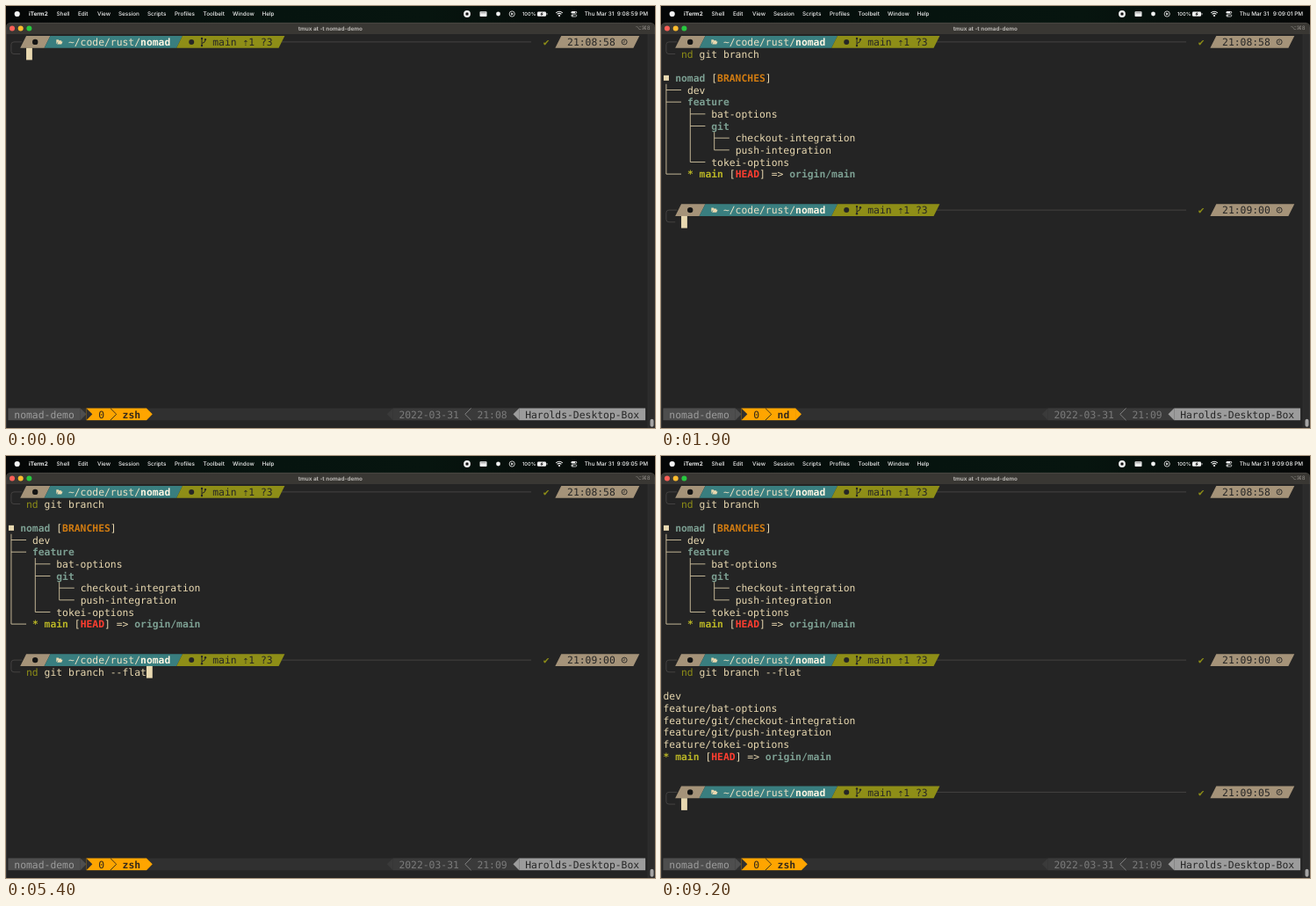
Recreate the animation shown at these times as an HTML page. Size 739 by 480 pixels, loop 9.3 s.

```html
<!DOCTYPE html>
<html lang="en">
<head>
<meta charset="utf-8">
<title>Terminal demo</title>
<style>
html, body { margin: 0; width: 100%; height: 100%; overflow: hidden; background: #000; }
svg { display: block; width: 739px; height: 480px; }
text { white-space: pre; text-rendering: geometricPrecision; font-kerning: none; }
.mono { font: 11.37px "DejaVu Sans Mono", monospace; font-variant-ligatures: none; }
.ui { font: 500 6.35px Inter, sans-serif; fill: #f2f2f2; }
.b { font-weight: 700; }
</style>
</head>
<body>
<svg id="stage" viewBox="0 0 739 480" xmlns="http://www.w3.org/2000/svg"></svg>
<script>
const LOOP = 9300, STEP = 100;
const CW = 6.845, RH = 13.66;
const X = c => 2.5 + c * CW;
const Y = r => 34.05 + r * RH;
const MID = r => Y(r) + RH / 2;

const CREAM = '#e8d8b0', TEAL = '#397e7f', TAN = '#a59379', OLIVE = '#8e8e17',
  DARK = '#262626', AQUA = '#7c9f92', ORANGE = '#d27c11', RED = '#ff3e30',
  LIME = '#b9b526', RULE = '#484644', AMBER = '#ffa500';

const mono = (c, r, s, fill = CREAM, bold = false) =>
  `<text class="mono${bold ? ' b' : ''}" x="${X(c)}" y="${Y(r) + 11}" fill="${fill}">${s.replace(/>/g, '&gt;')}</text>`;
const ui = (x, s, extra = '') => `<text class="ui" x="${x}" y="11.3" ${extra}>${s}</text>`;
const box = (x, y, w, h, fill, extra = '') =>
  `<rect x="${x}" y="${y}" width="${w}" height="${h}" fill="${fill}" ${extra}/>`;
const dot = (x, y, r, fill) => `<circle cx="${x}" cy="${y}" r="${r}" fill="${fill}"/>`;
const ring = (x, y, r, color, w = 0.8) =>
  `<circle cx="${x}" cy="${y}" r="${r}" fill="none" stroke="${color}" stroke-width="${w}"/>`;
const poly = (pts, fill) => `<polygon points="${pts}" fill="${fill}"/>`;
const line = (d, color, w = 0.9) =>
  `<path d="${d}" fill="none" stroke="${color}" stroke-width="${w}"/>`;
const group = (id, body) => `<g id="${id}">${body}</g>`;

// Segment with both ends cut like a slash
function slash(a, b, r, fill) {
  const t = Y(r), u = t + RH;
  return poly([X(a), u, X(a + 1), t, X(b + 1), t, X(b), u], fill);
}

// Filled powerline arrow, one cell wide; dir 1 points right, -1 left
function arrow(c, r, dir, fill) {
  const base = X(dir > 0 ? c : c + 1), tip = base + dir * CW;
  return poly([base, Y(r), tip, MID(r), base, Y(r) + RH], fill);
}

function prompt(r, clock) {
  const m = MID(r), cx = X(102.5);
  return line(`M${X(2.3)} ${m}H9Q5.9 ${m} 5.9 ${m + 3}V${m + RH - 3}Q5.9 ${m + RH} 9 ${m + RH}H${X(2)}`, RULE) +
    line(`M${X(45.5)} ${m}H${X(87)}`, RULE) +
    slash(2, 6, r, TAN) + slash(6, 28, r, TEAL) + slash(28, 45, r, OLIVE) + slash(91, 104, r, TAN) +
    dot(33.2, m, 3.2, '#141414') +
    `<path d="M57.3 ${m + 2.4}V${m - 2.6}h2.4l.8 .9h2.6v1.3h-3.8zM58.2 ${m + 2.6}l1.4-3h5l-1.4 3z" fill="${CREAM}"/>` +
    mono(10, r, '~/code/rust/', '#eadfc3') + mono(22, r, 'nomad', '#fbf5e2', true) +
    dot(211.2, m, 3, DARK) +
    line(`M223 ${m - 3.6}V${m + 4.4}M223 ${m + 1.6}Q227 ${m + 1} 227 ${m - 2.4}`, DARK, 1) +
    dot(223, m - 4, 1.2, DARK) + dot(223, m + 4.2, 1.2, DARK) + dot(227, m - 2.8, 1.2, DARK) +
    mono(34, r, 'main ⇡1 ?3', DARK) +
    mono(89, r, '✔', OLIVE) + mono(93, r, clock, DARK) +
    ring(cx, m, 3, DARK, 0.9) + line(`M${cx} ${m - 1.8}V${m + .4}H${cx - 1.5}`, DARK, 0.7);
}

const headLine = (c, r) =>
  mono(c, r, '*', LIME, true) + mono(c + 2, r, 'main', LIME, true) +
  mono(c + 7, r, '[') + mono(c + 8, r, 'HEAD', RED, true) + mono(c + 12, r, '] =>') +
  mono(c + 17, r, 'origin/main', AQUA, true);

// Tree stem in column c from row a to row z, with a branch at each listed row
function stem(c, a, z, rows) {
  const x = X(c + .5);
  return line(`M${x} ${Y(a)}V${MID(z)}` + rows.map(r => `M${x} ${MID(r)}H${X(c + 3)}`).join(''), '#d3c4a1', 0.9);
}

function tree() {
  return box(3, MID(3) - 3, 6, 6, CREAM) +
    mono(2, 3, 'nomad', AQUA, true) + mono(8, 3, '[') + mono(9, 3, 'BRANCHES', ORANGE, true) + mono(17, 3, ']') +
    mono(4, 4, 'dev') + mono(4, 5, 'feature', AQUA, true) + mono(8, 6, 'bat-options') +
    mono(8, 7, 'git', AQUA, true) + mono(12, 8, 'checkout-integration') +
    mono(12, 9, 'push-integration') + mono(8, 10, 'tokei-options') + headLine(4, 11) +
    stem(0, 4, 11, [4, 5, 11]) + stem(4, 6, 10, [6, 7, 10]) + stem(8, 8, 9, [8, 9]);
}

function flat() {
  return ['dev', 'feature/bat-options', 'feature/git/checkout-integration',
    'feature/git/push-integration', 'feature/tokei-options']
    .map((s, i) => mono(0, 17 + i, s)).join('') + headLine(0, 22);
}

const command = (id, r) =>
  `<text class="mono" x="${X(3)}" y="${Y(r) + 11}"><tspan id="${id}Cmd" fill="${OLIVE}"></tspan>` +
  `<tspan id="${id}Arg" fill="${CREAM}"></tspan></text>`;

function menuBar() {
  const items = [[57.5, 'Shell'], [82, 'Edit'], [104, 'View'], [128, 'Session'], [161, 'Scripts'],
    [192, 'Profiles'], [224.5, 'Toolbelt'], [258, 'Window'], [291.5, 'Help']];
  const w = '#f2f2f2';
  return box(0, 0, 739, 19, 'url(#sky)') + dot(12.7, 9, 3.1, w) +
    ui(26, 'iTerm2', 'font-weight="700" style="font-weight:700"') +
    items.map(([x, s]) => ui(x, s)).join('') +
    dot(525, 9, 3.9, w) + box(523.5, 7.5, 3, 3, '#111', 'rx=".5"') +
    box(539.5, 6.2, 8, 5.8, w, 'rx=".8"') + line('M540.5 7.8H546.5', '#555', 0.6) +
    dot(560.5, 9, 2.4, w) +
    ring(576.2, 9, 3.1, w) + poly([575.2, 7.4, 578, 9, 575.2, 10.6], w) +
    ui(588, '100%', 'style="font-size:5.7px"') +
    box(605, 6.5, 10, 5.2, w, 'rx="1.2"') + box(615.5, 8, 1, 2.2, '#aaa') +
    poly([610.8, 6.8, 608.2, 9.5, 609.8, 9.5, 609.2, 11.5, 612, 8.7, 610.3, 8.7], '#111') +
    line('M626.2 7.8Q630 4.6 633.8 7.8M627.6 9.4Q630 7.4 632.4 9.4', w, 1.1) + dot(630, 11, 1.1, w) +
    box(643.5, 6, 6.6, 2.6, w, 'rx="1.3"') + dot(648.7, 7.3, .8, '#111') +
    box(643.8, 9.8, 6, 2.2, 'none', `rx="1.1" stroke="${w}" stroke-width=".7"`) + dot(645, 10.9, .8, w) +
    ui(658.7, 'Thu Mar 31') + `<text class="ui" id="clock" x="731" y="11.3" text-anchor="end"></text>`;
}

function windowFrame() {
  return box(0, 19, 739, 470, '#242424', 'rx="5"') +
    `<path d="M0 32V24Q0 19 5 19H734Q739 19 739 24V32Z" fill="#393733"/>` +
    line('M4 19.3H735', '#55524d', 0.6) +
    line('M.4 24V480M738.6 24V480', '#484848', 0.6) +
    box(731, 32, 7.4, 448, '#2b2b2b') + line('M731 32V480', '#353535', 0.5) +
    box(733.5, 469.8, 4, 9, '#a5a5a5', 'rx="2"') +
    dot(7, 25.5, 3, '#ff5f57') + dot(16.7, 25.5, 3, '#febc2e') + dot(26.4, 25.5, 3, '#28c840') +
    `<text class="ui" x="369.3" y="27.6" text-anchor="middle" style="font-weight:700;fill:#b9b7b3">tmux at -t nomad-demo</text>` +
    `<text x="733.5" y="27.2" text-anchor="end" fill="#8d8a85" style="font:6px 'DejaVu Sans',sans-serif">⌥⌘8</text>`;
}

function statusBar() {
  const r = 31, y = Y(r), bar = '#303030', gray = '#4e4e4e', pale = '#9c9c9c', mid = '#3a3a3a';
  const span = (a, b, fill) => box(X(a), y, X(b) - X(a), RH, fill);
  return span(0, 106, bar) +
    span(0, 12, gray) + arrow(12, r, 1, gray) + mono(1, r, 'nomad-demo', pale) +
    `<rect id="tab" x="${X(13)}" y="${y}" height="${RH}" fill="${AMBER}"/>` +
    arrow(13, r, 1, bar) + mono(15, r, '0', '#33281a') +
    line(`M${X(17)} ${y}L${X(18)} ${MID(r)}L${X(17)} ${y + RH}`, '#33281a', 0.9) +
    `<text id="tabName" class="mono b" x="${X(19)}" y="${y + 11}" fill="#33281a"></text>` +
    `<g id="tabTip">${arrow(0, r, 1, AMBER)}</g>` +
    arrow(63, r, -1, mid) + span(64, 85, mid) + mono(65, r, '2022-03-31', '#7b7b7b') +
    line(`M${X(77)} ${y}L${X(76)} ${MID(r)}L${X(77)} ${y + RH}`, '#8a8a8a', 0.9) +
    `<text id="tmuxTime" class="mono" x="${X(78)}" y="${y + 11}" fill="#7b7b7b"></text>` +
    arrow(84, r, -1, pale) + span(85, 106, pale) + mono(86, r, 'Harolds-Desktop-Box', '#262626');
}

const $ = id => document.getElementById(id);
$('stage').innerHTML =
  `<defs><linearGradient id="sky"><stop offset="0" stop-color="#050606"/><stop offset=".42" stop-color="#06140f"/>` +
  `<stop offset=".65" stop-color="#07150f"/><stop offset="1" stop-color="#050606"/></linearGradient></defs>` +
  menuBar() + windowFrame() + statusBar() +
  prompt(0, '21:08:58') + command('first', 1) +
  group('treeOut', tree() + prompt(14, '21:09:00') + command('second', 15)) +
  group('flatOut', flat() + prompt(25, '21:09:05')) +
  `<rect id="cursor" width="${CW}" height="${RH}" fill="${CREAM}"/>`;

const show = (id, on) => $(id).setAttribute('visibility', on ? 'visible' : 'hidden');
// Characters typed at time t, with n keys spread from a to b
const keys = (t, a, b, n) => Math.max(0, Math.min(n, Math.floor((t - a) / (b - a) * n)));

const BASE = 'nd git branch', FLAG = ' --flat';
const RUN_TREE = 900, RUN_FLAT = 5500, TAB_RESET = 4200;

function type(id, s) {
  $(id + 'Cmd').textContent = s.slice(0, 2);
  $(id + 'Arg').textContent = s.slice(2);
}

function draw(t) {
  const sec = 59 + Math.floor((t + 700) / 1000);
  $('clock').textContent = `9:${sec < 60 ? '08' : '09'}:${String(sec % 60).padStart(2, '0')} PM`;

  const one = keys(t, 0, 800, BASE.length);
  const two = keys(t, 3200, 4200, BASE.length) + keys(t, 4400, 5300, FLAG.length);
  type('first', BASE.slice(0, one));
  type('second', (BASE + FLAG).slice(0, two));

  const ranTree = t >= RUN_TREE, ranFlat = t >= RUN_FLAT;
  show('treeOut', ranTree);
  show('flatOut', ranFlat);
  const [col, row] = ranFlat ? [3, 26] : ranTree ? [3 + two, 15] : [3 + one, 1];
  $('cursor').setAttribute('x', X(col));
  $('cursor').setAttribute('y', Y(row));

  const name = ranTree && t < TAB_RESET ? 'nd' : 'zsh';
  const end = 20 + name.length;
  $('tabName').textContent = name;
  $('tab').setAttribute('width', (end - 13) * CW + 0.1);
  $('tabTip').setAttribute('transform', `translate(${end * CW} 0)`);
  $('tmuxTime').textContent = ranTree ? '21:09' : '21:08';
}

const start = performance.now();
function tick() {
  const t = (performance.now() - start) % LOOP;
  draw(Math.floor(t / STEP) * STEP);
  requestAnimationFrame(tick);
}
tick();
</script>
</body>
</html>
```
